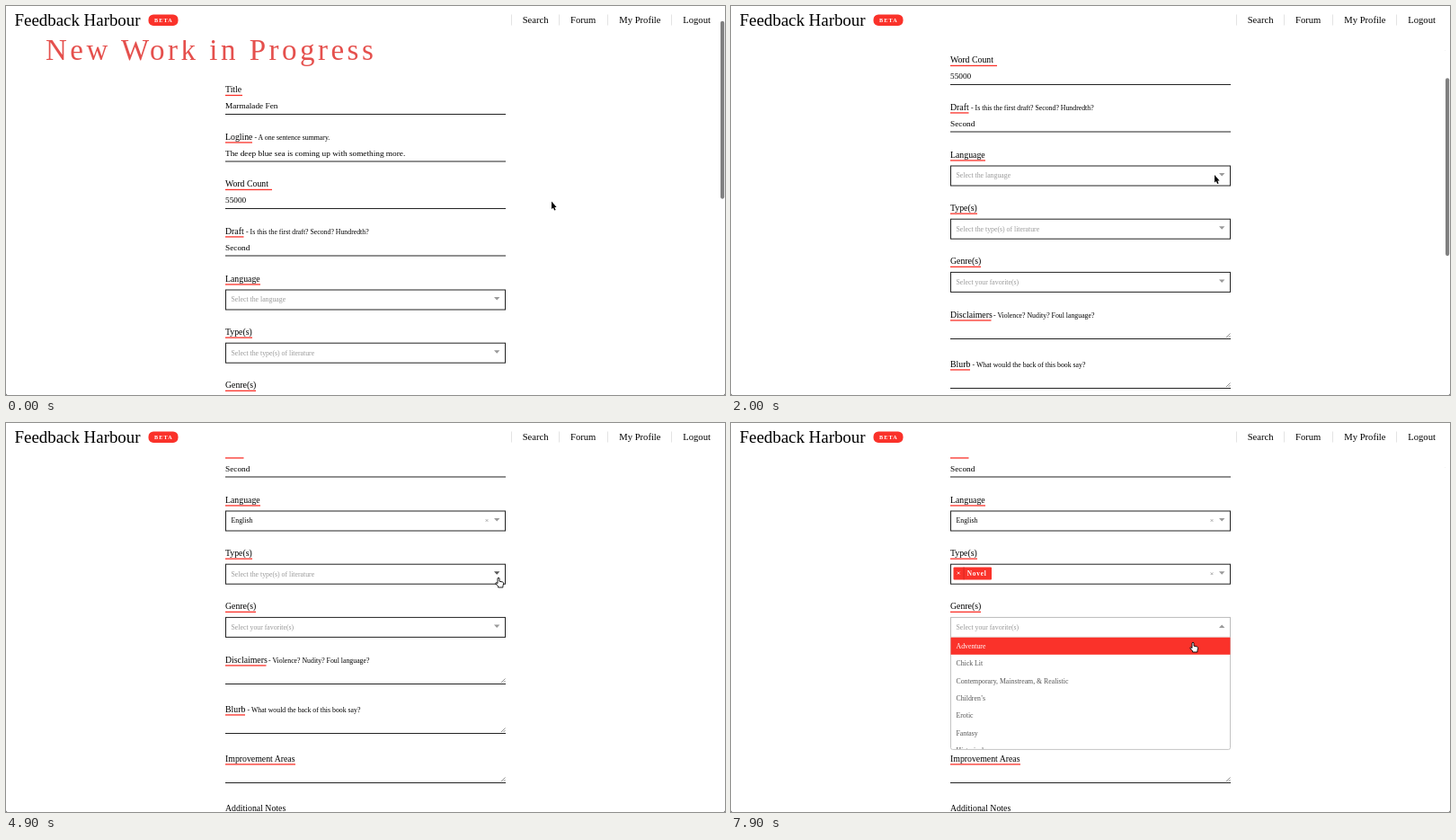
Animation of 800x433 px, one loop 8000 ms. Source, as an HTML page:

```html
<!DOCTYPE html>
<html lang="en">
<head>
<meta charset="utf-8">
<title>New Work in Progress</title>
<style>
  html, body { margin: 0; width: 100%; height: 100%; overflow: hidden; background: #fff; }
  svg { display: block; }
  text { font-family: "Liberation Serif", "Times New Roman", serif; white-space: pre; }
</style>
</head>
<body>
<svg id="stage" width="100%" height="100%" viewBox="0 0 800 433"></svg>
<script>
const LOOP = 8000, STEP = 100;
const RED = '#fa322a', INK = '#000', LINE = '#222', GREY = '#999';
const LEFT = 244, WIDTH = 312, BOX_H = 22, ROW_H = 19.4, LIST_H = 125;
const stage = document.getElementById('stage');

function el(parent, tag, attrs = {}, content) {
  const node = document.createElementNS('http://www.w3.org/2000/svg', tag);
  set(node, attrs);
  if (content !== undefined) node.textContent = content;
  parent.appendChild(node);
  return node;
}
function set(node, attrs) {
  for (const key in attrs) node.setAttribute(key, attrs[key]);
}
function show(node, visible) {
  node.style.display = visible ? '' : 'none';
}
function text(parent, x, y, size, content, fill = INK, more = {}) {
  return el(parent, 'text', { x, y, 'font-size': size, fill, ...more }, content);
}
function rect(parent, x, y, width, height, fill, more = {}) {
  return el(parent, 'rect', { x, y, width, height, fill, ...more });
}

const page = el(stage, 'g');

function label(y, name, width, hint) {
  text(page, LEFT, y, 9.8, name);
  rect(page, LEFT, y + 2.8, width, 1.3, RED);
  if (hint) text(page, LEFT + width + 2.5, y, 7.8, '- ' + hint);
}
function rule(y) {
  rect(page, LEFT, y - 0.5, WIDTH, 1, LINE);
}

// Scrolling form
text(page, 44, 60, 33, 'New Work in Progress', '#e5504d', { 'letter-spacing': 3.5 });

[
  ['Title', 19, '', 'Marmalade Fen'],
  ['Logline', 30, 'A one sentence summary.', 'The deep blue sea is coming up with something more.'],
  ['Word Count', 52, '', '55000'],
  ['Draft', 20.5, 'Is this the first draft? Second? Hundredth?', 'Second']
].forEach(([name, width, hint, value], i) => {
  const y = 96 + 52.5 * i;
  label(y, name, width, hint);
  text(page, LEFT, y + 18.2, 9.28, value);
  rule(y + 24.5);
});

[
  ['Disclaimers', 45.5, 'Violence? Nudity? Foul language?'],
  ['Blurb', 22, 'What would the back of this book say?'],
  ['Improvement Areas', 78, ''],
  ['Additional Notes', 67, '']
].forEach(([name, width, hint], i) => {
  const y = 484.5 + 55 * i;
  label(y, name, width, hint);
  rule(y + 24);
  el(page, 'path', { d: `M551 ${y + 22.5}l4.5 -4.5M553.5 ${y + 22.5}l2 -2`, stroke: '#777', 'stroke-width': 0.8 });
});

const selects = [
  {
    name: 'Language', width: 39, hint: 'Select the language', open: 2400, close: 3700, value: 'English',
    options: ['English', 'Chinese', 'German', 'Spanish', 'Japanese', 'Russian', 'French']
  },
  {
    name: 'Type(s)', width: 30, hint: 'Select the type(s) of literature', open: 5100, close: 6300, value: 'Novel', chip: true,
    options: ['Fiction', 'Nonfiction', 'Novel', 'Novella', 'Poetry', 'Short Story', 'Screenplay']
  },
  {
    name: 'Genre(s)', width: 34, hint: 'Select your favorite(s)', open: 7300, close: LOOP,
    options: ['Adventure', 'Chick Lit', 'Contemporary, Mainstream, & Realistic', 'Children\u2019s', 'Erotic', 'Fantasy', 'Historical']
  }
];

function cross(parent, x, y, size, color) {
  el(parent, 'path', {
    d: `M${x - size} ${y - size}l${2 * size} ${2 * size}m0 ${-2 * size}l${-2 * size} ${2 * size}`,
    stroke: color, 'stroke-width': 0.8
  });
}

function buildSelect(s, i) {
  const top = s.top = 316 + 59.2 * i;
  label(top - 9.5, s.name, s.width);
  s.box = rect(page, LEFT + 0.5, top, WIDTH - 1, BOX_H, '#fff');
  s.placeholder = text(page, 250.5, top + 13.3, 7.8, s.hint, GREY);
  s.arrow = el(page, 'path');
  s.picked = el(page, 'g');
  if (s.value) cross(s.picked, 535, top + 10.5, 1.3, GREY);
  if (s.chip) {
    rect(s.picked, 247.5, top + 3.2, 42.5, 14, RED, { rx: 1 });
    rect(s.picked, 258.7, top + 3.2, 0.7, 14, '#c9251f');
    cross(s.picked, 253.2, top + 9.8, 1.4, '#fff');
    text(s.picked, 262.7, top + 12.8, 7.3, s.value, '#fff', { 'font-weight': 'bold', 'letter-spacing': 0.8 });
  } else if (s.value) {
    text(s.picked, 250.5, top + 13.3, 7.8, s.value);
  }
}

function buildMenu(s) {
  const y = s.top + BOX_H;
  s.menu = el(page, 'g');
  const path = `M244.5 ${y}v${LIST_H - 2}q0 2 2 2h307q2 0 2 -2v${2 - LIST_H}`;
  el(s.menu, 'path', { d: path, fill: '#fff', stroke: '#c4c4c4' });
  rect(s.menu, LEFT + 1, y - 0.5, WIDTH - 2, 1, '#e6e6e6');
  const list = el(s.menu, 'svg', { x: LEFT, y, width: WIDTH, height: LIST_H - 0.5, overflow: 'hidden' });
  s.mark = rect(list, 0.5, 0, WIDTH - 1, ROW_H, RED);
  s.rows = s.options.map((name, i) => text(list, 6.5, 12.4 + ROW_H * i, 7.8, name));
  s.caret = rect(s.menu, 250.5, s.top + 5, 0.8, 11, LINE);
}

selects.forEach(buildSelect);
selects.forEach(buildMenu);

// Fixed header
rect(stage, 0, 0, 800, 38, '#fff');
text(stage, 9.5, 21.7, 18.9, 'Feedback Harbour');
rect(stage, 158.5, 9.5, 33, 12.4, RED, { rx: 5.5 });
text(stage, 165, 17.8, 6.2, 'BETA', '#fff', { 'font-weight': 'bold', 'letter-spacing': 1.1 });
[[562, 574.7, 'Search'], [615, 628, 'Forum'], [669, 682.3, 'My Profile'], [740, 753.3, 'Logout']]
  .forEach(([line, x, name]) => {
    rect(stage, line, 9.5, 0.8, 12, '#ddd');
    text(stage, x, 19, 10.6, name);
  });

const bar = rect(stage, 795, 0, 4.2, 198, '#808080', { rx: 2.1 });
el(stage, 'path', { d: 'M0 431.5L1.5 433H0ZM800 431.5L798.5 433H800Z', fill: '#777' });

const arrowCursor = el(stage, 'path', {
  d: 'M0 0V8.6L1.8 6.9L3.2 10L4.6 9.4L3.3 6.4H5.6Z',
  fill: '#000', stroke: '#fff', 'stroke-width': 0.8, 'paint-order': 'stroke'
});
const handCursor = el(stage, 'path', {
  d: 'M-1 .8Q0 -.6 1 .8V4.2L4.6 5Q5.8 5.3 5.6 6.8L4.9 9.6V11H-.4V9.8L-3.2 6.8Q-3.4 5.4 -2 5.8L-1 6.6Z',
  fill: '#fff', stroke: '#000', 'stroke-width': 0.9, 'stroke-linejoin': 'round'
});

// Tracks hold [time, ...values]
const scrollTrack = [[0, 0], [500, 64], [700, 64], [800, 66], [1500, 138], [3800, 138], [4300, 218]];
const fadeTrack = [[0, 1], [2000, 1], [2200, 0], [3800, 0], [3900, 1], [4600, 1], [4800, 0]];
const cursorTrack = [
  [0, 607, 217.5, 0], [1600, 607, 217.5, 0], [2000, 538, 188, 0], [2200, 543, 189, 1], [2700, 543, 189, 1],
  [3100, 496, 207, 1], [3700, 496, 207, 0], [4400, 496, 207, 0], [4900, 548, 172, 1], [5400, 548, 172, 1],
  [6000, 527, 219, 1], [6400, 527, 219, 1], [7000, 546, 224, 1], [7400, 546, 224, 1], [7800, 514, 244, 1]
];

const smooth = k => k * k * (3 - 2 * k);

function sample(track, t) {
  let i = track.length - 1;
  while (track[i][0] > t) i--;
  const a = track[i], b = track[i + 1] || a;
  const k = a === b ? 0 : smooth((t - a[0]) / (b[0] - a[0]));
  return a.slice(1).map((v, n) => v + (b[n + 1] - v) * k);
}

function drawSelect(s, t, scroll, x, y, hand) {
  const open = t >= s.open && t < s.close;
  const done = !!s.value && t >= s.close;
  const top = s.top - scroll;
  const hover = hand && !open && x > LEFT && x < LEFT + WIDTH && y > top && y < top + BOX_H;
  const mid = s.top + 10;
  set(s.box, { stroke: open ? '#bbb' : LINE });
  set(s.arrow, {
    d: open ? `M543 ${mid + 1.5}h6.4l-3.2 -3.5z` : `M543 ${mid - 2}h6.4l-3.2 3.5z`,
    fill: hover ? '#555' : GREY
  });
  show(s.placeholder, !done);
  show(s.picked, done);
  show(s.menu, open);
  if (!open) return;
  const active = Math.max(0, Math.floor((y - top - BOX_H) / ROW_H));
  set(s.mark, { y: active * ROW_H });
  s.rows.forEach((row, i) => set(row, { fill: i === active ? '#fff' : '#555' }));
  show(s.caret, (t - s.open) % 1000 < 500);
}

function draw(t) {
  const [scroll] = sample(scrollTrack, t);
  const [x, y, kind] = sample(cursorTrack, t);
  const hand = kind > 0.6;
  set(page, { transform: `translate(0 ${-scroll})` });
  set(bar, { y: 16.7 + scroll * 0.46, opacity: sample(fadeTrack, t)[0] });
  selects.forEach(s => drawSelect(s, t, scroll, x, y, hand));
  show(handCursor, hand);
  show(arrowCursor, !hand);
  set(hand ? handCursor : arrowCursor, { transform: `translate(${x} ${y})` });
}

function tick() {
  draw(Math.floor(performance.now() % LOOP / STEP) * STEP);
  requestAnimationFrame(tick);
}
tick();
</script>
</body>
</html>
```
